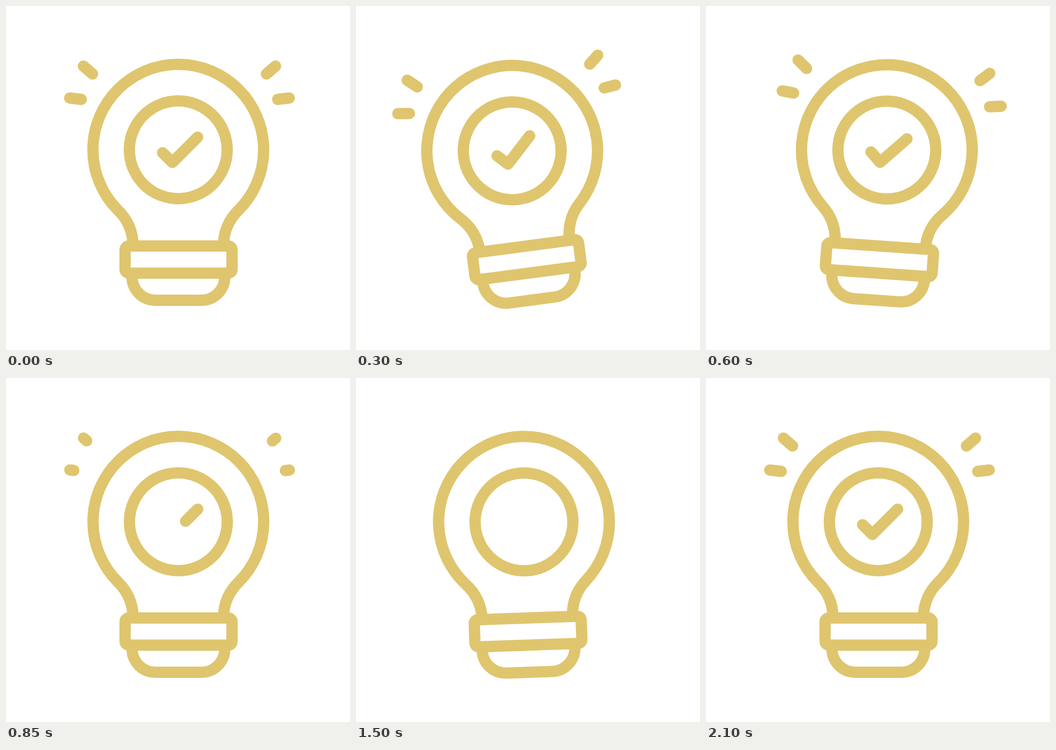
An HTML page for the animation above (2500 ms loop, 640 by 640 pixels).

```html
<!DOCTYPE html>
<html lang="en">
<head>
<meta charset="utf-8">
<title>Idea bulb</title>
<style>
  html, body { margin: 0; width: 100%; height: 100%; overflow: hidden; background: #fff; }
  svg { display: block; width: 100vw; height: 100vh; }
</style>
</head>
<body>
<svg viewBox="0 0 640 640">
  <g id="bulb" fill="none" stroke="#dfc56e" stroke-width="21" stroke-linejoin="round">
    <path d="M236.5 446C236 417 225 396 208.2 379.7A158.8 158.8 0 1 1 432.8 379.7C416 396 405 417 404.5 446"/>
    <circle cx="320.5" cy="267.5" r="91"/>
    <rect x="221.5" y="446.5" width="199" height="50.5" rx="7"/>
    <path d="M234.5 497V504A43.5 43.5 0 0 0 278 547.5H363.5A43.5 43.5 0 0 0 407 504V497"/>
    <g stroke-linecap="round">
      <path class="ray" pathLength="100" d="M161 126.5L144 111.8"/>
      <path class="ray" pathLength="100" d="M140 173.7L118.5 171.2"/>
      <path class="ray" pathLength="100" d="M484.5 126.5L501.5 111.8"/>
      <path class="ray" pathLength="100" d="M505.5 173.7L527 171.2"/>
      <path id="check" pathLength="100" d="M291.3 273L309.5 291L356.5 244"/>
    </g>
  </g>
</svg>
<script>
const LOOP = 2500, STEP = 50, SWING = 30;
const bulb = document.getElementById('bulb');
const check = document.getElementById('check');
const rays = document.querySelectorAll('.ray');

const progress = (x, from, to) => Math.min(1, Math.max(0, (x - from) / (to - from)));
const easeOut = p => 1 - (1 - p) ** 2;
const easeInOut = p => p < 0.5 ? 2 * p * p : 1 - 2 * (1 - p) ** 2;

// Tilt in degrees; x counts ticks (1/30 s) since the swing began.
function tilt(x) {
  if (x < 12) return -8 * easeOut(progress(x, 0, 12));
  if (x < 18) return -8 + 12 * easeInOut(progress(x, 12, 18));
  return 4 - 4 * easeInOut(progress(x, 18, 25.5));
}

// Shows only the stretch from a to b (0..1) of a path.
function trim(path, a, b) {
  path.style.visibility = b > a ? 'visible' : 'hidden';
  path.setAttribute('stroke-dasharray', `${(b - a) * 100} 300`);
  path.setAttribute('stroke-dashoffset', -a * 100);
}

function draw(ms) {
  const tick = Math.min(63, Math.floor(Math.floor(ms / STEP) * 1.5));
  const angle = tilt(tick < SWING ? tick : tick - SWING);
  bulb.setAttribute('transform', `rotate(${angle} 320.5 496.5)`);

  const erased = easeInOut(progress(tick, 18, 30));
  const grown = easeInOut(progress(tick, 48, 63));
  const growing = tick >= 48;
  rays.forEach(ray => growing ? trim(ray, 0, grown) : trim(ray, erased, 1));
  trim(check, growing ? 1 - grown : erased, 1);
}

function loop(now) {
  draw(now % LOOP);
  requestAnimationFrame(loop);
}
draw(0);
requestAnimationFrame(loop);
</script>
</body>
</html>
```
